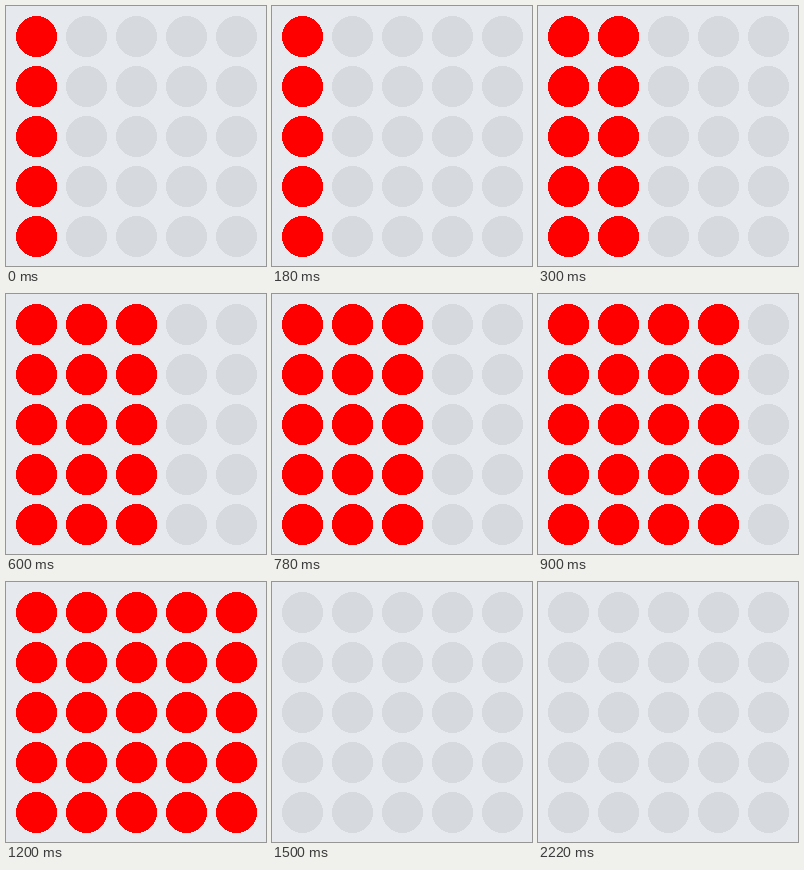
An HTML page that plays this animation: 260 px wide and 260 px high, repeating every 2.7 s.

```html
<!DOCTYPE html>
<html lang="en">
<head>
<meta charset="utf-8">
<title>Dot columns</title>
<style>
  html, body { margin: 0; width: 100%; height: 100%; overflow: hidden; background: #e6eaef; }
  svg { display: block; width: 260px; height: 260px; shape-rendering: crispEdges; }
</style>
</head>
<body>
<svg id="stage" viewBox="0 0 260 260"></svg>
<script>
const SVG = "http://www.w3.org/2000/svg";
const SIZE = 5, PITCH = 50, FIRST = 30.5, RADIUS = 20.5;
const STEP = 300, LOOP = 2700;
const OFF = "#d6dade", ON = "#ff0000";

function add(parent, tag, attrs) {
  const node = document.createElementNS(SVG, tag);
  for (const key in attrs) node.setAttribute(key, attrs[key]);
  return parent.appendChild(node);
}

const stage = document.getElementById("stage");
const columns = Array.from({ length: SIZE }, (_, col) => {
  const group = add(stage, "g", { fill: OFF });
  for (let row = 0; row < SIZE; row++) {
    add(group, "circle", { cx: FIRST + col * PITCH, cy: FIRST + row * PITCH, r: RADIUS });
  }
  return group;
});

// Columns light up one by one, then all go dark for the rest of the loop.
function draw(time) {
  const step = Math.floor((time % LOOP) / STEP);
  columns.forEach((group, col) => {
    group.setAttribute("fill", step < SIZE && col <= step ? ON : OFF);
  });
}

const start = performance.now();
function tick() {
  draw(performance.now() - start);
  requestAnimationFrame(tick);
}
tick();
</script>
</body>
</html>
```
